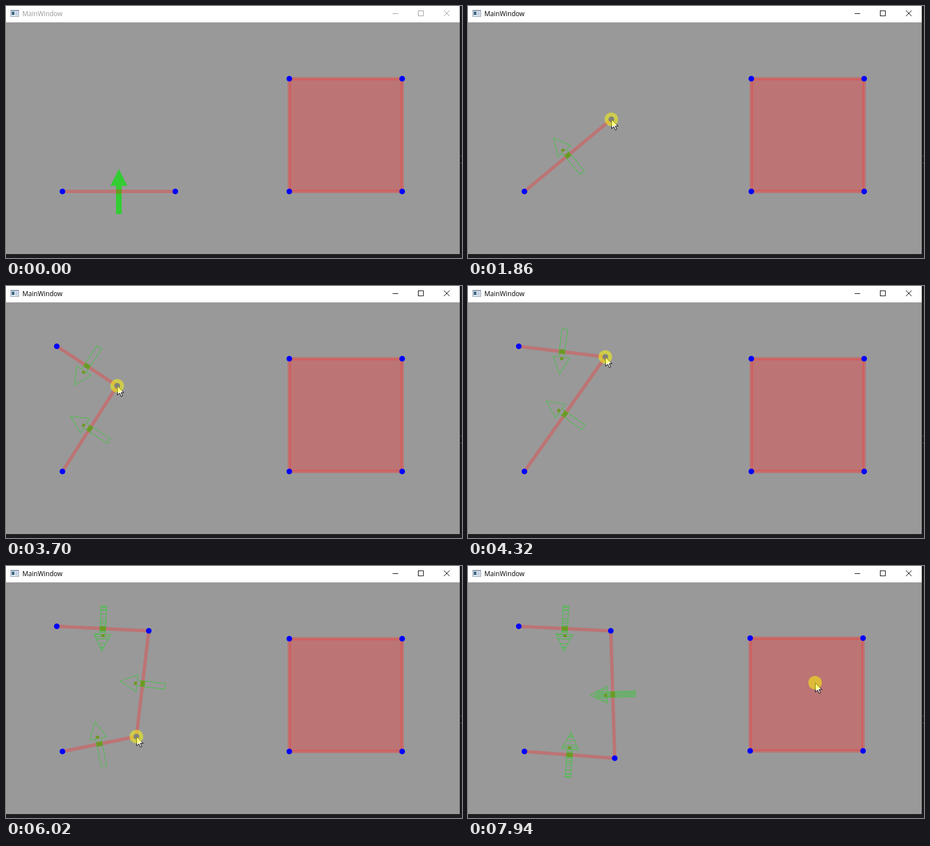
Animation of 808x447 px, one loop 8 s. Source, as an HTML page with a canvas:

```html
<!DOCTYPE html>
<html>
<head>
<meta charset="utf-8">
<style>
html, body { margin: 0; width: 808px; height: 447px; overflow: hidden; background: #1b1c1f; }
canvas { display: block; }
</style>
</head>
<body>
<canvas id="stage" width="808" height="447"></canvas>
<script>
const g = document.getElementById('stage').getContext('2d');
const LOOP = 8000, TICK = 77; // the picture refreshes once per tick
const RED = 'rgba(236,66,64,.42)', GREEN = '#33cc33', OLIVE = '#6c9a23';
const A = [100, 329], B = [90, 107], C = [253, 115], D = [260, 341];
const START = [300, 329], ENTRY = [412, 405];

// Pointer moves: first tick, last tick, destination
const moves = [
  [4, 13, [302, 328]],
  [19, 24, [254, 201]],
  [24, 31, B],
  [35, 41, [94, 214]],
  [43, 48, [197, 177]],
  [48, 59, C],
  [63, 68, [170, 221]],
  [73, 82, D],
  [89, 90, [257, 336]],
  [90, 91, [254, 308]],
  [94, 98, [617, 200]],
  [100, 101, [615, 207]]
];
const presses = [[20, 35], [43, 64], [71, 90], [103, 104]];

const ease = p => p * (1.5 - p / 2);
const noise = n => Math.abs(Math.sin(n * 12.9898) * 43758.5453) % 1;

function pointerAt(tick) {
  let pos = ENTRY;
  for (const [from, to, goal] of moves) {
    if (tick < from) break;
    const p = ease(Math.min(1, (tick - from) / (to - from)));
    pos = pos.map((v, i) => v + (goal[i] - v) * p);
  }
  return pos;
}

function chainAt(tick, pointer) {
  if (tick < 20) return [A, START];
  if (tick < 35) return [A, pointer];
  if (tick < 43) return [A, B];
  if (tick < 63) return [A, pointer, B];
  if (tick < 71) return [A, C, B];
  return [A, tick < 89 ? pointer : D, C, B];
}

function trace(points) {
  g.beginPath();
  points.forEach(([x, y]) => g.lineTo(x, y));
}

function line(color, width, ...points) {
  trace(points);
  g.strokeStyle = color;
  g.lineWidth = width;
  g.stroke();
}

function rect(color, x, y, w, h) {
  g.fillStyle = color;
  g.fillRect(x, y, w, h);
}

function disc(color, [x, y], r) {
  g.beginPath();
  g.arc(x, y, r, 0, 2 * Math.PI);
  g.fillStyle = color;
  g.fill();
}

// Broken scanlines inside the current clip, in screen direction
function scanlines() {
  for (let y = -42; y < 42; y += 2) {
    const x = -42 + 12 * noise(y + 100);
    if (noise(y) < .65) line(GREEN, 1, [x, y + .5], [x + 72, y + .5]);
  }
}

// Normal arrow of a segment: solid at first, a wireframe while dragged, then hatched
function arrow(a, b, style) {
  const turn = Math.atan2(b[1] - a[1], b[0] - a[0]);
  const shape = [[0, -40], [15, -10], [5, -10], [5, 40], [-5, 40], [-5, -10], [-15, -10]];
  g.save();
  g.translate((a[0] + b[0]) / 2, (a[1] + b[1]) / 2);
  g.rotate(turn);
  trace(shape);
  g.closePath();
  if (style === 'solid') {
    g.fillStyle = GREEN;
    g.fill();
  } else {
    g.globalAlpha = .8;
    g.strokeStyle = GREEN;
    g.lineWidth = 1;
    g.stroke();
    if (style === 'hatched') {
      g.save();
      g.clip();
      g.rotate(-turn);
      scanlines();
      g.restore();
    }
    g.globalAlpha = 1;
    rect(OLIVE, -4, -15, 6, 5);
  }
  rect(OLIVE, -5, -4, 10, 8);
  g.restore();
}

function titleBar(active) {
  const ink = active ? '#000' : '#999';
  rect('#fff', 0, 0, 804, 29);
  rect('#8795a8', 8, 7, 15, 12);
  rect('#f4f7fa', 9, 9, 13, 9);
  rect('#3d6a86', 10, 10, 5, 6);
  rect('#c3d0e0', 16, 10, 5, 7);
  g.fillStyle = ink;
  g.font = '11.7px "Open Sans", "Noto Sans", sans-serif';
  g.fillText('MainWindow', 29, 18);
  rect(ink, 685, 13, 10, 1);
  g.strokeStyle = ink;
  g.lineWidth = 1;
  g.strokeRect(730.5, 8.5, 9, 9);
  line(ink, 1, [776, 8], [786, 18]);
  line(ink, 1, [786, 8], [776, 18]);
}

function square(x, y) {
  rect(RED, x, y, 200, 200);
  g.strokeStyle = RED;
  g.lineWidth = 6;
  g.strokeRect(x, y, 200, 200);
  for (const dx of [0, 200]) for (const dy of [0, 200]) disc('#00f', [x + dx, y + dy], 5);
}

function cursor([x, y]) {
  g.save();
  g.translate(x + .5, y + .5);
  trace([[0, 0], [0, 16], [4, 12.5], [6.5, 18.5], [9, 17.5], [6.5, 11.5], [11.5, 11.5]]);
  g.closePath();
  g.fillStyle = '#fff';
  g.fill();
  g.strokeStyle = '#000';
  g.lineWidth = 1;
  g.stroke();
  g.restore();
}

function draw(tick) {
  const pointer = pointerAt(tick);
  const held = presses.some(([from, to]) => tick >= from && tick < to);
  const chain = chainAt(tick, pointer);
  rect('#1b1c1f', 0, 0, 808, 447);
  for (const y of [265, 278]) rect('#45464a', 805, y, 3, 1);
  rect('#999', 0, 29, 804, 411);
  titleBar(tick >= 20);

  for (let i = 1; i < chain.length; i++) {
    const ends = [chain[i - 1], chain[i]];
    const dragged = held && ends.includes(pointer);
    line(RED, 6, ...ends);
    arrow(...ends, tick < 20 ? 'solid' : dragged ? 'wire' : 'hatched');
  }
  chain.forEach(point => disc('#00f', point, 5));

  const nudged = tick >= 103;
  square(nudged ? 500 : 502, nudged ? 128 : 129);
  if (tick >= 4) cursor(pointer);
  if (held) disc('rgba(255,255,0,.5)', pointer, 12);
}

function run(now) {
  draw(Math.floor((now % LOOP + 8) / TICK));
  requestAnimationFrame(run);
}
requestAnimationFrame(run);
</script>
</body>
</html>
```
